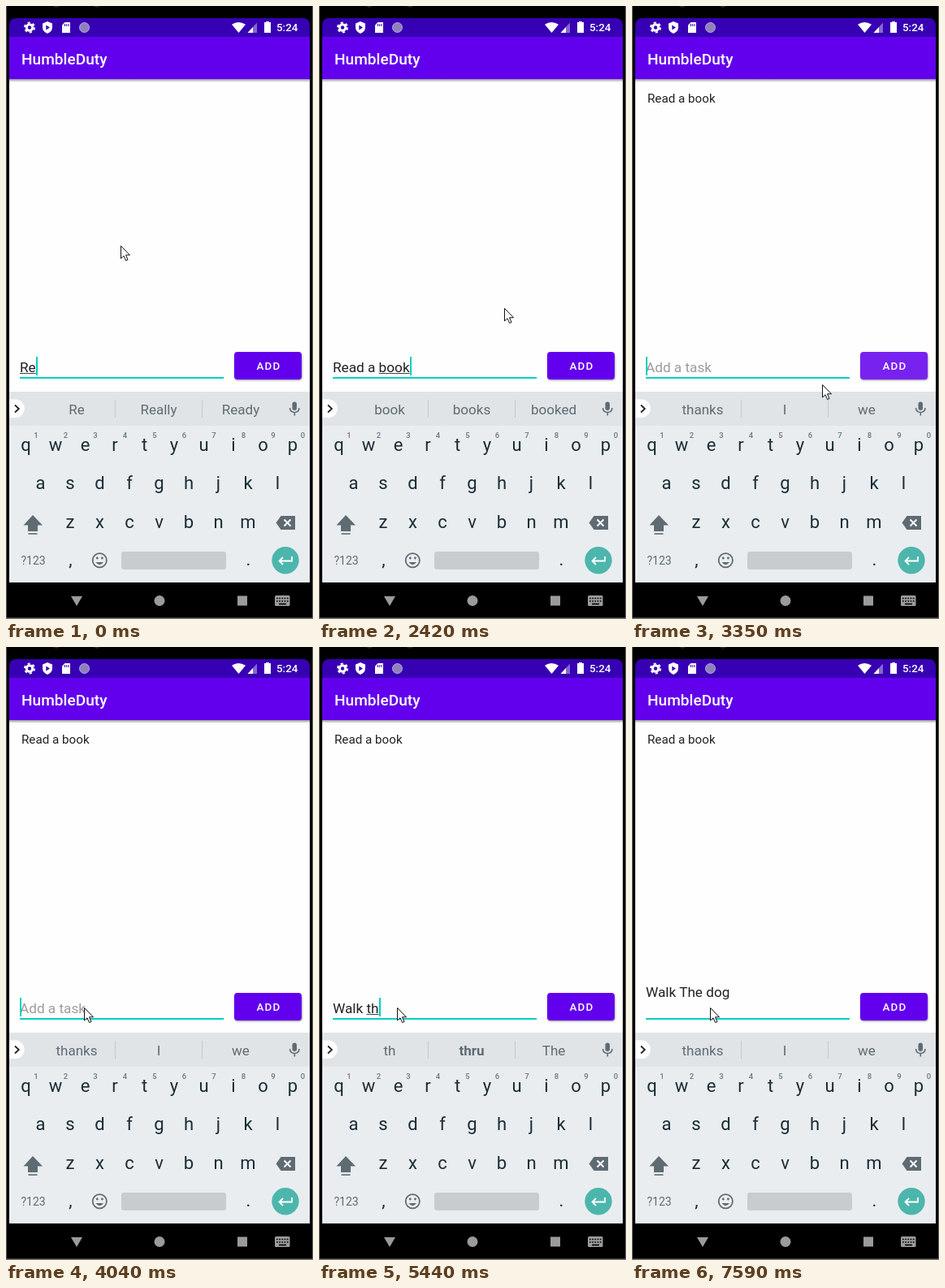
Recreate the animation shown at these times as an HTML page. Size 378x755 px, loop 7990 ms.

```html
<!DOCTYPE html>
<html lang="en">
<head>
<meta charset="utf-8">
<title>To-do list demo</title>
<style>
  html, body { margin: 0; width: 100%; height: 100%; overflow: hidden; background: #000; }
  svg { display: block; width: 378px; height: 755px; }
  text { font-family: Roboto, sans-serif; white-space: pre; }
  .mid { text-anchor: middle; }
  .line { fill: none; stroke-width: 1.8; }
</style>
</head>
<body>
<svg viewBox="0 0 378 755">
  <defs>
    <linearGradient id="drop" x2="0" y2="1">
      <stop stop-color="#999"/><stop offset="1" stop-color="#fff"/>
    </linearGradient>
    <filter id="blur" x="-20%" y="-30%" width="140%" height="180%"><feGaussianBlur stdDeviation="1.3"/></filter>
  </defs>

  <!-- phone and app -->
  <rect width="378" height="755"/>
  <path d="M.5 0V755M377.5 0V755" stroke="#555"/>
  <rect y="753.5" width="378" height="1.5" fill="#777"/>
  <g fill="#222"><circle cx="62" cy="-3" r="5"/><circle cx="112" cy="-3" r="5"/></g>
  <path d="M4 38V24Q4 15 13 15H365Q374 15 374 24V38Z" fill="#3700b3"/>
  <rect x="4" y="90" width="370" height="385" fill="#fefefe"/>
  <rect x="4" y="90" width="370" height="4" fill="url(#drop)"/>
  <rect x="4" y="38" width="370" height="52" fill="#6200ee"/>

  <!-- status bar -->
  <g fill="#fff">
    <circle cx="29" cy="26.5" r="3.7" fill="none" stroke="#fff" stroke-width="3"/>
    <circle cx="29" cy="26.5" r="6" fill="none" stroke="#fff" stroke-width="2" stroke-dasharray="3.1 3.18"/>
    <path d="M51 19L57 21.5V26Q57 31.5 51 34Q45 31.5 45 26V21.5Z"/>
    <path d="M49.3 23.5L54 26.5L49.3 29.5Z" fill="#3700b3"/>
    <path d="M72.5 20H79V33H69V23.5Z"/>
    <path d="M72.5 22V25M74.7 22V25M77 22V25" stroke="#3700b3"/>
    <circle cx="96.5" cy="26.5" r="6" fill="#8f80bd" stroke="#b5a8d8"/>
    <path d="M278 22.8Q286 17 295 22.8L286.5 33Z"/>
    <path d="M297.5 33L309 20.5V33Z" opacity=".4"/>
    <path d="M297.5 33L304 26V33Z"/>
    <path d="M320 20V19H324V20H326V33H318V20Z"/>
    <text x="333" y="31.3" font-size="13.4" font-weight="500">5:24</text>
    <text x="19" y="71.5" font-size="19.1" font-weight="500">HumbleDuty</text>
  </g>

  <!-- list and entry field -->
  <text id="item" x="19" y="119" font-size="15.2" fill="#212121">Read a book</text>
  <text id="entry" x="17" font-size="17.2"/>
  <path id="spell" stroke="#444"/>
  <rect x="17" y="457" width="251" height="2" fill="#03cfc0"/>
  <rect id="caret" width="2" fill="#03cfc0"/>
  <rect id="shadow" x="281.5" y="428" width="83" height="33" rx="4" fill="#000" filter="url(#blur)"/>
  <rect id="button" x="281" y="426" width="83" height="34" rx="4"/>
  <text x="323.5" y="448" class="mid" font-size="13.4" font-weight="500" letter-spacing="1.2" fill="#fff">ADD</text>

  <!-- keyboard -->
  <rect x="4" y="475" width="370" height="235" fill="#e9edf0"/>
  <rect x="4" y="475" width="370" height="42" fill="#e0e4e7"/>
  <path d="M4 484.5H11.5A11.2 11.2 0 0 1 11.5 507H4Z" fill="#fff"/>
  <path d="M11 491.5L15.8 496L11 500.5" class="line" stroke="#222"/>
  <path d="M134.5 485V507M241.5 485V507" stroke="#c3c9cc"/>
  <g id="suggestions" class="mid" font-size="17" fill="#5f6b72">
    <text x="87" y="502.5"/><text x="188" y="502.5"/><text x="289" y="502.5"/>
  </g>
  <g id="dog" fill="#e9b659">
    <path d="M180 488Q179 493 183 493H192L195 497V505H192V500H185V505H182V498L179 493Z" transform="matrix(-1 0 0 1 375 0)"/>
    <circle cx="184" cy="493" r="5"/>
    <path d="M179 492V486L183 489ZM185 489L189 486V492Z" fill="#c98a3b"/>
    <ellipse cx="183.5" cy="495.5" rx="2.7" ry="2" fill="#fff3d8"/>
    <path d="M181 492h1.2M186 492h1.2M183 495h1.5" stroke="#333" stroke-width="1.4"/>
  </g>
  <g fill="#5f6b72" stroke="#5f6b72" stroke-width="0">
    <rect x="352.5" y="487.5" width="5.5" height="10.5" rx="2.7"/>
    <path d="M349.5 495Q350 500.5 355.3 500.5T361 495M355.3 500.5V504.5" class="line" style="stroke-width:1.6"/>
    <path d="M33 627L45 639.5H39V647H27V639.5H21.5Z"/>
    <rect x="27.5" y="649.3" width="11" height="1.6"/>
    <path d="M332.5 636.5L338.5 628H356V645H338.5Z"/>
    <path d="M342.5 632.5L350.5 640.5M350.5 632.5L342.5 640.5" class="line" stroke="#fff"/>
    <text x="18.5" y="688" font-size="14">?123</text>
    <circle cx="115.3" cy="682.7" r="8.6" class="line"/>
    <circle cx="112.3" cy="680" r="1.4"/><circle cx="118.4" cy="680" r="1.4"/>
    <path d="M110.5 685Q115.3 691.5 120 685Z"/>
  </g>
  <rect x="142" y="672" width="129" height="22" rx="3" fill="#c8cccf"/>
  <circle cx="344" cy="682.7" r="16.7" fill="#4db6ac"/>
  <path d="M352 678V683.5H337M341 679L336.5 683.5L341 688" class="line" stroke="#fff"/>
  <g id="keys" class="mid" font-size="22" fill="#1b2c35"></g>

  <!-- navigation bar -->
  <g fill="#9b9b9b">
    <path d="M80 727H94L87 739Z"/>
    <circle cx="189" cy="732.5" r="6.5"/>
    <rect x="285" y="726.5" width="12" height="12"/>
    <rect x="331" y="726" width="18.5" height="13" rx="1.5"/>
    <path d="M333 729.5H348M333 733H348" stroke="#000" stroke-width="1.6" stroke-dasharray="1.7 1.5"/>
    <path d="M336 736.5H345" stroke="#000" stroke-width="1.6"/>
  </g>

  <path id="mouse" d="M.5 .5V16L4 12.8L6.6 18.6L9 17.5L6.5 11.8H11.5Z" fill="#fff" stroke="#111"/>
</svg>

<script>
const LOOP = 7990;
const el = id => document.getElementById(id);

// Each entry: start time, then the values that hold until the next entry.
// Typed text: the part after "|" is still being composed and underlined.
const typing = [
  [0, "|Re"], [280, "|Read"], [400, "Read "], [550, "Read a "], [950, "Read a |b"],
  [1350, "Read a |bo"], [1500, "Read a |boo"], [1620, "Read a |book"], [2930, ""],
  [4500, "|W"], [4650, "|Wa"], [4770, "|Wal"], [5020, "|Walk"], [5170, "Walk "],
  [5290, "Walk |t"], [5440, "Walk |th"], [5560, "Walk |the"], [5680, "Walk The "],
  [5830, "Walk The |do"], [5980, "Walk The |dog"], [6910, "Walk The dog\n"]
];
// "*" marks the bold correction, "@" the dog picture.
const hints = [
  [0, "Re Really Ready"], [280, "Read Ready Reading"], [400, "the it this"], [550, "new good few"],
  [950, "b be by"], [1350, "bo *Bo no"], [1500, "boo book booked"], [1620, "book books booked"],
  [3080, "thanks I we"], [4500, "W We What"], [4650, "Wa Was Wait"], [4770, "Wal Walk Walked"],
  [5020, "Walk Wall Walked"], [5170, "to the in"], [5290, "t to the"], [5440, "th *thru The"],
  [5560, "the The them"], [5680, "people same problem"], [5830, "do dog done"],
  [5980, "dog @ dogs"], [7190, "thanks I we"]
];
const caretOn = [
  [0, 1], [2050, 0], [2420, 1], [3500, 0], [4040, 1], [6380, 0], [6910, 1], [7590, 0]
];
const pointer = [
  [0, 141, 295], [2300, 175, 328], [2420, 228, 372], [2540, 273, 411], [2690, 307, 446],
  [3230, 272, 454], [3350, 234, 466], [3500, 206, 490], [3620, 184, 499], [3770, 128, 468],
  [3890, 96, 444]
];
// Button colour and shadow strength
const press = [
  [0, "#6200ee", .4], [2810, "#7f37f1", .65], [2930, "#9a5cf4", .65], [3080, "#9853f5", .4],
  [3230, "#8a3ff3", .4], [3350, "#7822f0", .4], [3500, "#6a0eee", .4], [3620, "#6200ee", .4]
];

const at = (track, t) => track.findLast(step => step[0] <= t).slice(1);

function buildKeys() {
  const key = (c, x, y, extra = "") => `<text x="${x}" y="${y}" ${extra}>${c}</text>`;
  const row = (letters, x, y) => [...letters].map((c, i) => key(c, x + 36.5 * i, y)).join("");
  const digits = [..."1234567890"].map((c, i) =>
    key(c, 37 + 36.5 * i, 532, 'font-size="9.5" font-weight="500" fill="#6b767c"')).join("");
  el("keys").innerHTML = row("qwertyuiop", 24.5, 547.5) + digits + row("asdfghjkl", 42.5, 595)
    + row("zxcvbnm", 79, 642.5) + key(",", 79.5, 689) + key(".", 298.5, 689);
}

function drawEntry(t) {
  const [typed] = at(typing, t), entry = el("entry");
  const newline = typed.endsWith("\n");
  const [done, composing] = typed.trimStart().replace("\n", "").split("|");
  const text = done + (composing || "");
  entry.textContent = text || "Add a task";
  entry.setAttribute("y", newline ? 430.5 : 450.5);
  entry.setAttribute("fill", text ? "#212121" : "#9c9c9c");
  const widthOf = n => n ? entry.getSubStringLength(0, n) : 0;
  const end = 17 + widthOf(text.length);
  el("spell").setAttribute("d", composing ? `M${17 + widthOf(done.length)} 452.5H${end}` : "");
  const caret = el("caret"), top = newline ? 435 : 432;
  caret.setAttribute("x", newline ? 17 : Math.round(end));
  caret.setAttribute("y", top);
  caret.setAttribute("height", 455 - top);
  caret.setAttribute("opacity", at(caretOn, t)[0]);
}

function drawHints(t) {
  const words = at(hints, t)[0].split(" ");
  [...el("suggestions").children].forEach((node, i) => {
    node.textContent = words[i].replace(/[*@]/, "");
    node.setAttribute("font-weight", words[i][0] === "*" ? 700 : 400);
  });
  el("dog").setAttribute("opacity", words[1] === "@" ? 1 : 0);
}

function draw(t) {
  drawEntry(t);
  drawHints(t);
  el("item").setAttribute("opacity", t >= 3080 ? 1 : 0);
  const [color, shade] = at(press, t);
  el("button").setAttribute("fill", color);
  el("shadow").setAttribute("opacity", shade);
  el("shadow").setAttribute("y", shade > .5 ? 431 : 428);
  el("mouse").setAttribute("transform", `translate(${at(pointer, t)})`);
}

buildKeys();
const start = performance.now();
function tick() {
  draw((performance.now() - start) % LOOP);
  requestAnimationFrame(tick);
}
tick();
</script>
</body>
</html>
```
